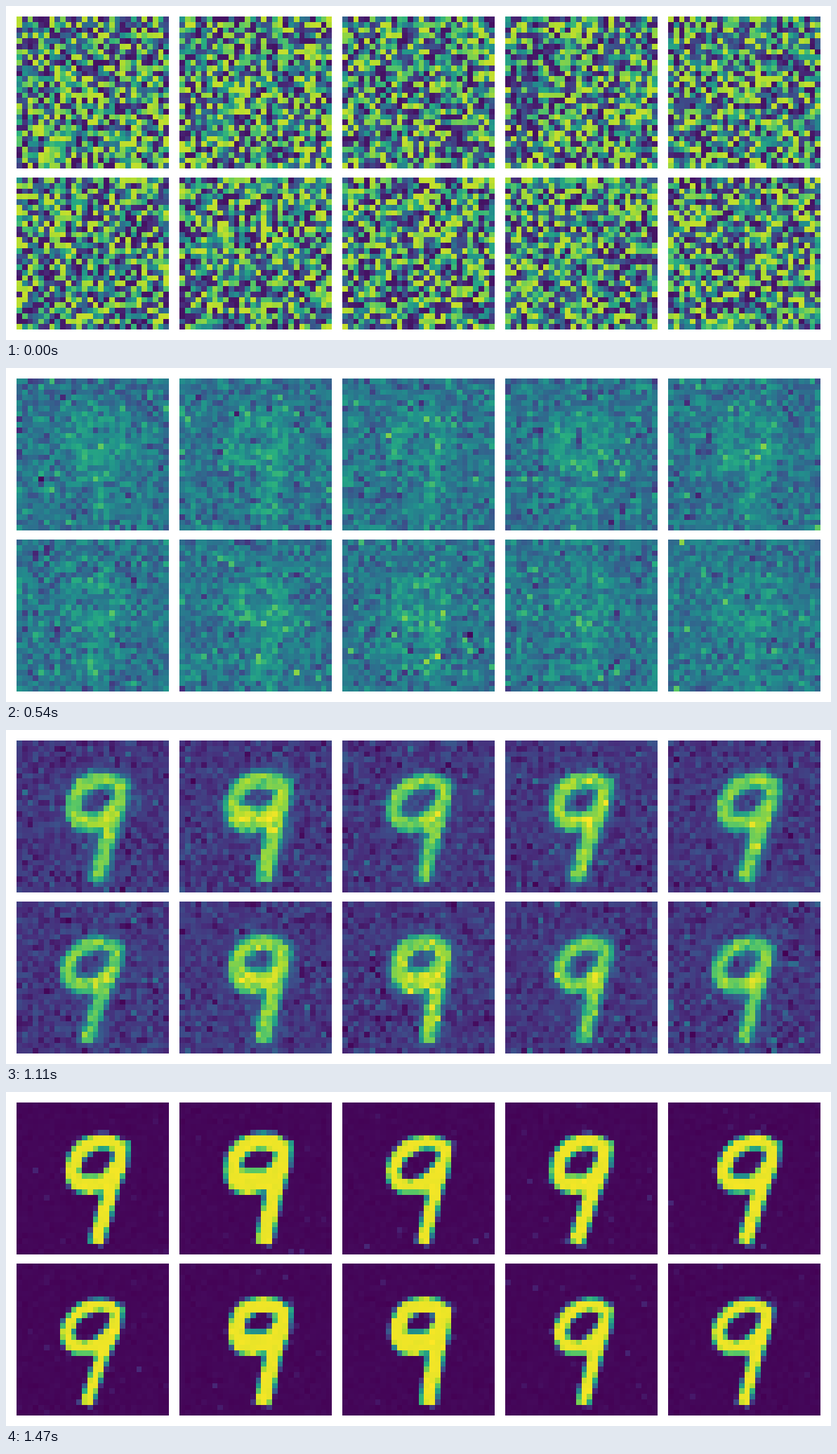
Animation of 1175x477 px, one loop 1.5 s. Source, as an HTML page with a canvas:

```html
<!DOCTYPE html>
<html lang="en">
<head>
<meta charset="utf-8">
<title>Denoising digits</title>
<style>
  html, body { margin: 0; width: 100%; height: 100%; overflow: hidden; background: #fff; }
  canvas { display: block; }
</style>
</head>
<body>
<canvas id="stage" width="1175" height="477"></canvas>
<script>
const GRID = 28, CELLS = GRID * GRID, PANEL = 217;
const STEPS = 50, STEP_MS = 30;

// Handwriting of each nine, in cells: loop left, loop right, foot, pen width
const NINES = [
  [10.3, 19.4, 14.6, 2.8], [9.8, 19.2, 15.4, 3.1], [9.3, 19, 14.8, 2.5], [9.6, 18.6, 13, 2.8], [10.2, 19.4, 14, 2.7],
  [9.2, 18.6, 12.8, 2.4], [10.4, 19.2, 15.2, 3], [10.2, 18.7, 15.6, 3], [10.1, 18.7, 14.2, 2.5], [9.2, 18.3, 13.8, 2.4]
];

const VIRIDIS = [0x440154, 0x472d7b, 0x3b528b, 0x2c728e, 0x21918c, 0x28ae80, 0x5ec962, 0xaddc30, 0xfde725]
  .map(c => [c >> 16, c >> 8 & 255, c & 255]);

const lerp = (a, b, t) => a + (b - a) * t;
const clamp = v => Math.min(1, Math.max(0, v));

const stage = document.getElementById('stage').getContext('2d');
stage.imageSmoothingEnabled = false;
const tile = document.createElement('canvas');
tile.width = tile.height = GRID;
const pen = tile.getContext('2d', { willReadFrequently: true });
const image = pen.createImageData(GRID, GRID);

let seed = 9;
function random() {
  seed = seed + 0x6D2B79F5 | 0;
  let h = Math.imul(seed ^ seed >>> 15, 1 | seed);
  h = h + Math.imul(h ^ h >>> 7, 61 | h) ^ h;
  return ((h ^ h >>> 14) >>> 0) / 4294967296;
}
const wave = () => Math.sin(2 * Math.PI * random());
const gauss = () => Math.sqrt(-2 * Math.log(1 - random())) * wave();

// Thin pens lean the loop over, thick pens fill its lower edge.
function ninePath([left, right, foot, width], top) {
  const bottom = 15.5, elbow = (right + foot) / 2;
  const lean = Math.max(0, 3 - width) * 2, fill = Math.max(0, width - 2.5) * 3;
  return new Path2D(
    `M${right} ${top + 1.5}C${right - 2} ${top - 1.1 - lean * 0.3} ${left + lean} ${top - 1.2 + lean} ${left} ${bottom - 3}` +
    `Q${left} ${bottom} ${left + 3} ${bottom}Q${right - 2.5} ${bottom - 0.3} ${right - 0.2} ${top + 3}` +
    `M${left + 1} ${bottom - fill}H${right - 1.5}` +
    `M${right} ${top}Q${right} 12 ${elbow} 17L${foot} 26`);
}

function mask(path, width, filter) {
  pen.clearRect(0, 0, GRID, GRID);
  pen.filter = filter;
  pen.lineWidth = width;
  pen.lineJoin = 'round';
  pen.stroke(path);
  const { data } = pen.getImageData(0, 0, GRID, GRID);
  return Float32Array.from({ length: CELLS }, (_, i) => data[i * 4 + 3] / 255);
}

const digits = NINES.map((nine, p) => {
  const path = ninePath(nine, p < 5 ? 7.3 : 7.7), width = nine[3];
  return { crisp: mask(path, width, 'none'), soft: mask(path, width * 0.8, 'blur(0.8px)') };
});

// Each step keeps part of the previous noise and adds some fresh noise.
const KEEP = 0.84, FRESH = Math.sqrt(1 - KEEP * KEEP);
const noise = [Float32Array.from({ length: CELLS * NINES.length }, () => wave() * Math.SQRT2)];
for (let s = 1; s < STEPS; s++) noise.push(noise[s - 1].map(n => n * KEEP + gauss() * FRESH));

function paint(value, i) {
  const x = clamp(value) * (VIRIDIS.length - 1);
  const k = Math.min(VIRIDIS.length - 2, Math.floor(x));
  for (let c = 0; c < 3; c++) image.data[i * 4 + c] = lerp(VIRIDIS[k][c], VIRIDIS[k + 1][c], x - k);
  image.data[i * 4 + 3] = 255;
}

function draw(step) {
  const progress = step / (STEPS - 1), angle = progress * Math.PI / 2;
  const fade = Math.max(0, Math.cos(angle));
  const base = 0.015 + 0.465 * fade ** 1.2;
  const gain = 0.96 * Math.sin(angle) ** 2.6;
  const deviation = 0.006 + 0.1 * fade ** 0.75 + 0.2 * Math.exp(-1.5 * step);
  const sharpness = clamp(2 * progress - 1);

  digits.forEach(({ crisp, soft }, p) => {
    for (let i = 0; i < CELLS; i++) {
      const n = noise[step][p * CELLS + i];
      const specks = Math.max(0, n - 2) * 0.07;
      paint(base + gain * lerp(soft[i], crisp[i], sharpness) + n * deviation + specks, i);
    }
    pen.putImageData(image, 0, 0);
    stage.drawImage(tile, 15 + p % 5 * 232, p < 5 ? 15 : 245, PANEL, PANEL);
  });
}

let shown = -1;
function tick() {
  const step = Math.floor(performance.now() / STEP_MS) % STEPS;
  if (step !== shown) draw(shown = step);
  requestAnimationFrame(tick);
}
tick();
</script>
</body>
</html>
```
